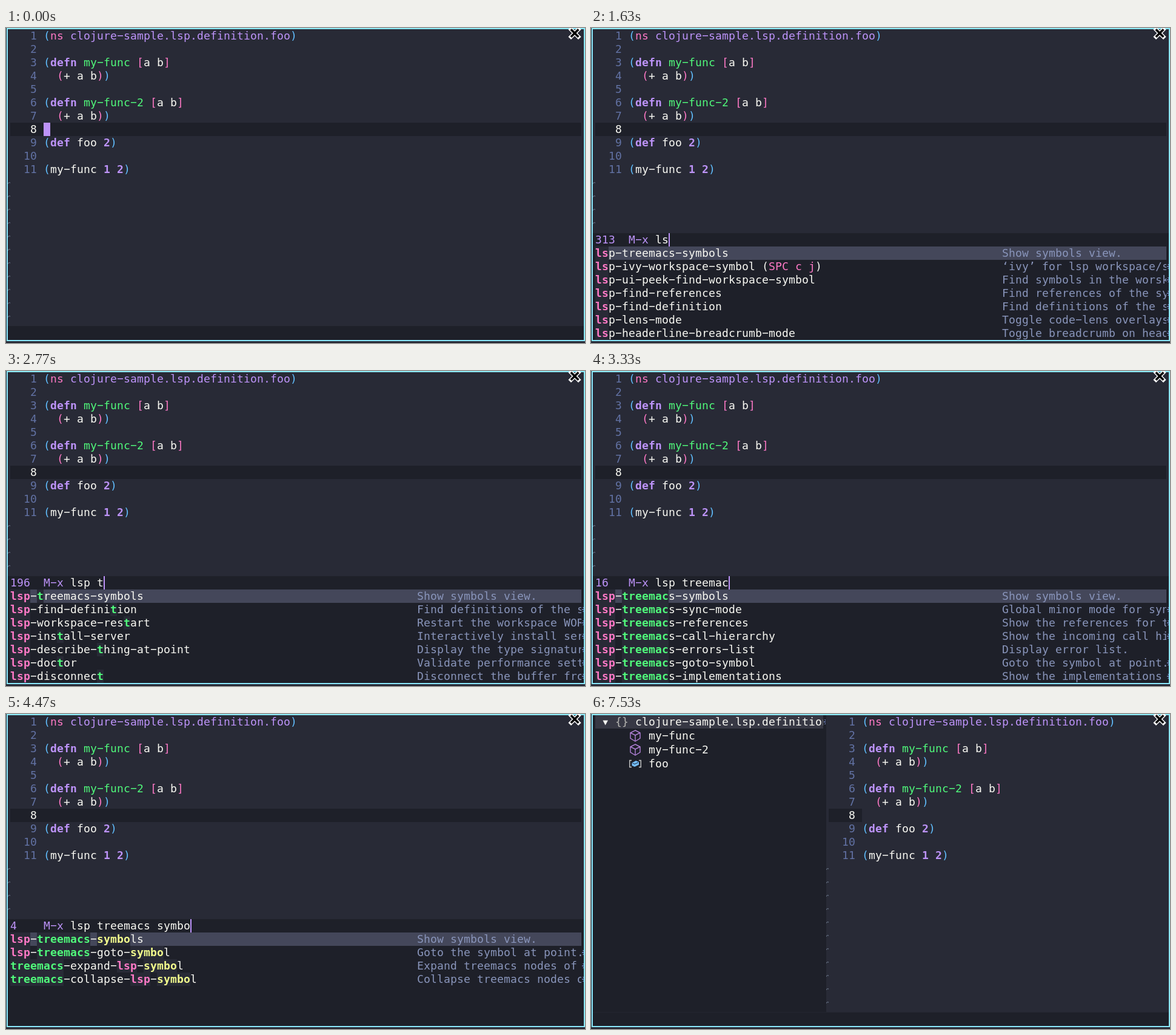
An HTML page with a canvas that plays this animation: 955x519 px, repeating every 8 s.

```html
<!DOCTYPE html>
<html>
<head>
<meta charset="utf-8">
<style>
html, body { margin: 0; width: 100%; height: 100%; overflow: hidden; background: #282a36 }
canvas { display: block }
</style>
</head>
<body>
<canvas id="stage" width="955" height="519"></canvas>
<script>
const ctx = document.getElementById('stage').getContext('2d');
const CELL = 11, ROW = 22, LOOP = 8000;
const bg = '#282a36', dark = '#1e2029', fg = '#f8f8f2', select = '#44475a', comment = '#6272a4',
  doc = '#8995bb', violet = '#bd93f9', pink = '#ff79c6', green = '#50fa7b', yellow = '#f1fa8c',
  blue = '#61bfff', cyan = '#8be9fd';

const code = ['(ns clojure-sample.lsp.definition.foo)', '', '(defn my-func [a b]', '  (+ a b))', '',
  '(defn my-func-2 [a b]', '  (+ a b))', '', '(def foo 2)', '', '(my-func 1 2)'];

const docs = {
  'lsp-treemacs-symbols': 'Show symbols view.',
  'lsp-ivy-workspace-symbol': '‘ivy’ for lsp workspace/symbol',
  'lsp-ui-peek-find-workspace-symbol': 'Find symbols in the worskpace.',
  'lsp-find-references': 'Find references of the symbol',
  'lsp-find-definition': 'Find definitions of the symbol',
  'lsp-lens-mode': 'Toggle code-lens overlays.',
  'lsp-headerline-breadcrumb-mode': 'Toggle breadcrumb on headerline.',
  'lsp-workspace-restart': 'Restart the workspace WORKSPACE',
  'lsp-clojure-server-info': 'Request server info.',
  'lsp': 'Entry point for the server startup.',
  'lsp-clojure-cycle-coll': 'Apply cycle-coll refactoring',
  'lsp-install-server': 'Interactively install server.',
  'lsp-describe-thing-at-point': 'Display the type signature',
  'lsp-doctor': 'Validate performance settings.',
  'lsp-disconnect': 'Disconnect the buffer from',
  'lsp-treemacs-sync-mode': 'Global minor mode for synchronizing',
  'lsp-treemacs-goto-symbol': 'Goto the symbol at point.',
  'lsp-treemacs-references': 'Show the references for the symbol',
  'lsp-treemacs-call-hierarchy': 'Show the incoming call hierarchy',
  'lsp-treemacs-errors-list': 'Display error list.',
  'lsp-treemacs-quick-fix': 'Select the element to fix.',
  'lsp-treemacs-implementations': 'Show the implementations for',
  'lsp-metals-treeview': 'Display the Metals treeview',
  'treemacs-expand-lsp-symbol': 'Expand treemacs nodes of type',
  'treemacs-collapse-lsp-symbol': 'Collapse treemacs nodes of type'
};

const words = s => s.split(' ');
const lists = {
  ls: words('lsp-treemacs-symbols lsp-ivy-workspace-symbol lsp-ui-peek-find-workspace-symbol lsp-find-references lsp-find-definition lsp-lens-mode lsp-headerline-breadcrumb-mode'),
  lsp: words('lsp-lens-mode lsp-headerline-breadcrumb-mode lsp-workspace-restart lsp-clojure-server-info lsp lsp-clojure-cycle-coll lsp-install-server'),
  t: words('lsp-treemacs-symbols lsp-find-definition lsp-workspace-restart lsp-install-server lsp-describe-thing-at-point lsp-doctor lsp-disconnect'),
  tree: words('lsp-treemacs-symbols lsp-treemacs-sync-mode lsp-metals-treeview lsp-treemacs-references lsp-treemacs-call-hierarchy lsp-treemacs-errors-list lsp-treemacs-goto-symbol'),
  treemacs: words('lsp-treemacs-symbols lsp-treemacs-sync-mode lsp-treemacs-references lsp-treemacs-call-hierarchy lsp-treemacs-errors-list lsp-treemacs-goto-symbol lsp-treemacs-implementations'),
  sy: words('lsp-treemacs-symbols lsp-treemacs-sync-mode lsp-treemacs-goto-symbol treemacs-expand-lsp-symbol treemacs-collapse-lsp-symbol'),
  symbol: words('lsp-treemacs-symbols lsp-treemacs-goto-symbol treemacs-expand-lsp-symbol treemacs-collapse-lsp-symbol')
};

// [start, candidate count, typed input, list, selected row]
const prompts = [
  [1630, 313, 'ls', 'ls', 0],
  [1970, 260, 'lsp', 'lsp', 4],
  [2130, 260, 'lsp ', 'lsp', 4],
  [2770, 196, 'lsp t', 't', 0],
  [2930, 18, 'lsp tre', 'tree', 0],
  [3100, 18, 'lsp tree', 'tree', 0],
  [3330, 16, 'lsp treemac', 'treemacs', 0],
  [3530, 16, 'lsp treemacs', 'treemacs', 0],
  [3730, 16, 'lsp treemacs s', 'treemacs', 0],
  [3930, 5, 'lsp treemacs sy', 'sy', 0],
  [4300, 4, 'lsp treemacs symb', 'symbol', 0],
  [4470, 4, 'lsp treemacs symbo', 'symbol', 0],
  [4670, 4, 'lsp treemacs symbol', 'symbol', 0]
];

function rect(x, y, w, h, color) {
  ctx.fillStyle = color;
  ctx.fillRect(x, y, w, h);
}

function shape(points, color, width) {
  ctx.beginPath();
  points.forEach(([x, y]) => ctx.lineTo(x, y));
  if (width) {
    ctx.strokeStyle = color;
    ctx.lineWidth = width;
    ctx.stroke();
  } else {
    ctx.fillStyle = color;
    ctx.fill();
  }
}

// Text on the character grid, with the editor font's wide hyphen
function put(text, x, top, color, bold) {
  ctx.font = `${bold ? 'bold ' : ''}18px "DejaVu Sans Mono", monospace`;
  ctx.fillStyle = color;
  [...text].forEach((ch, i) => {
    if (ch === '-') ctx.fillRect(x + i * CELL + 1, top + 10, 9, bold ? 2 : 1.5);
    else ctx.fillText(ch, x + i * CELL, top + 17);
  });
}

function clipped(x, w, draw) {
  ctx.save();
  ctx.beginPath();
  ctx.rect(x, 0, w, 519);
  ctx.clip();
  draw();
  ctx.restore();
}

function fringeArrow(x, top) {
  for (const [dx, dy, w, h] of [[2, 0, 2, 1], [3, 1, 1, 1], [1, 3, 3, 2], [3, 6, 1, 1], [2, 7, 2, 1]])
    rect(x + dx, top + 7 + dy, w, h, comment);
}

function codeLine(line, x, top) {
  let depth = 0, before = '';
  if (line.startsWith('  ')) depth = 1;
  for (const { 0: token, index } of line.matchAll(/[()[\]]|[^\s()[\]]+/g)) {
    let color = fg, bold = false;
    if (/[([]/.test(token)) color = depth++ ? pink : blue;
    else if (/[)\]]/.test(token)) color = --depth ? pink : blue;
    else if (token === 'ns') color = pink;
    else if (/^(defn?|\d)$/.test(token)) [color, bold] = [violet, true];
    else if (before === 'ns') color = violet;
    else if (before === 'defn') color = green;
    put(token, x + index * CELL, top, color, bold);
    before = token;
  }
}

// Code window whose fringe starts at the given x
function editor(left, focused) {
  const x = left + 4;
  rect(left, 2, 953 - left, 489, bg);
  rect(x, 156, focused ? 942 : 55, ROW, dark);
  code.forEach((line, i) => {
    const top = 2 + i * ROW;
    put(String(i + 1).padStart(4), x, top, i === 7 ? fg : comment);
    codeLine(line, x + 5 * CELL, top);
  });
  for (let y = 254; y < 480; y += ROW) {
    rect(left + 1, y, 3, 1, '#565f70');
    rect(left, y + 1, 2, 1, '#565f70');
    rect(left + 3, y + 1, 1, 1, '#565f70');
    rect(left, y + 2, 1, 1, '#565f70');
  }
}

function candidate(name, input, top, selected) {
  const colors = Array(name.length).fill(fg);
  input.trim().split(' ').forEach((word, k) => {
    const at = name.indexOf(word);
    if (at >= 0) colors.fill([pink, green, yellow][k], at, at + word.length);
  });
  if (selected) rect(7, top, 942, ROW, select);
  colors.forEach((color, i) => {
    const x = 7 + i * CELL, match = color !== fg;
    if (match) rect(x, top, CELL, ROW, bg);
    put(name[i], x, top, color, match);
  });
  if (name === 'lsp-ivy-workspace-symbol') {
    put('(       )', 282, top, fg);
    put('SPC c j', 293, top, pink);
  }
  clipped(0, 949, () => put(docs[name], 678, top, doc));
  if (docs[name].length > 24) fringeArrow(949, top);
}

function minibuffer([, count, input, list, selected], cursorHome) {
  rect(3, 338, 950, 176, dark);
  put(String(count).padEnd(5) + 'M-x', 7, 338, violet);
  put(input, 106, 338, fg);
  rect(cursorHome ? 7 : 106 + input.length * CELL, 338, 2, ROW, violet);
  lists[list].forEach((name, i) => candidate(name, input, 360 + i * ROW, i === selected));
}

function cube(x, y) {
  const color = '#b180d7';
  shape([[x, y - 9], [x + 8, y - 5], [x + 8, y + 4], [x, y + 9], [x - 8, y + 4], [x - 8, y - 5], [x, y - 9], [x + 8, y - 5]], color, 1.4);
  shape([[x - 8, y - 5], [x, y - 1], [x + 8, y - 5]], color, 1.4);
  shape([[x, y - 1], [x, y + 9]], color, 1.4);
}

function sidebar() {
  rect(3, 2, 385, 489, dark);
  rect(3, 491, 950, 1, '#242630');
  rect(7, 2, 376, ROW, '#373844');
  shape([[19.5, 10.5], [28, 10.5], [23.7, 18.5]], fg);
  put('{}', 40, 2, '#b6b6b2');
  clipped(0, 383, () => put('clojure-sample.lsp.definition.foo', 73, 2, fg));
  fringeArrow(383, 2);
  ['my-func', 'my-func-2', 'foo'].forEach((name, i) => put(name, 95, 25 + i * 23, fg));
  cube(73, 36);
  cube(73, 59);
  shape([[67, 76.5], [63.7, 76.5], [63.7, 87.5], [67, 87.5]], '#c5c5c5', 1.4);
  shape([[79, 76.5], [82.3, 76.5], [82.3, 87.5], [79, 87.5]], '#c5c5c5', 1.4);
  shape([[67.5, 80.5], [74, 77], [79, 79], [79, 83.5], [72, 87], [67.5, 85]], '#75beff');
  shape([[68.5, 81], [72, 82.5], [78, 79.8]], dark, 1);
}

function frame() {
  for (const [x, y, w, h] of [[1, 0, 954, 2], [1, 514, 954, 2], [1, 0, 2, 516], [953, 0, 2, 516]])
    rect(x, y, w, h, cyan);
  for (const [color, width, reach] of [['#fff', 6.5, 6], ['#000', 3.6, 5]]) {
    ctx.lineCap = 'square';
    for (const s of [1, -1])
      shape([[938 - reach, 8.5 - reach * s], [938 + reach, 8.5 + reach * s]], color, width);
    ctx.lineCap = 'butt';
  }
}

function render() {
  const t = performance.now() % LOOP;
  rect(0, 0, 955, 519, bg);
  rect(3, 491, 950, 23, dark);
  if (t >= 7530) {
    sidebar();
    editor(388, false);
  } else {
    editor(3, true);
    const prompt = prompts.findLast(p => t >= p[0]);
    if (prompt) minibuffer(prompt, t >= 5830);
    else {
      rect(62, 156, CELL, ROW, violet);
      if (t >= 570) put(t < 900 ? 'SPC-' : 'SPC :', 7, 492, fg);
    }
  }
  frame();
  requestAnimationFrame(render);
}
render();
</script>
</body>
</html>
```
